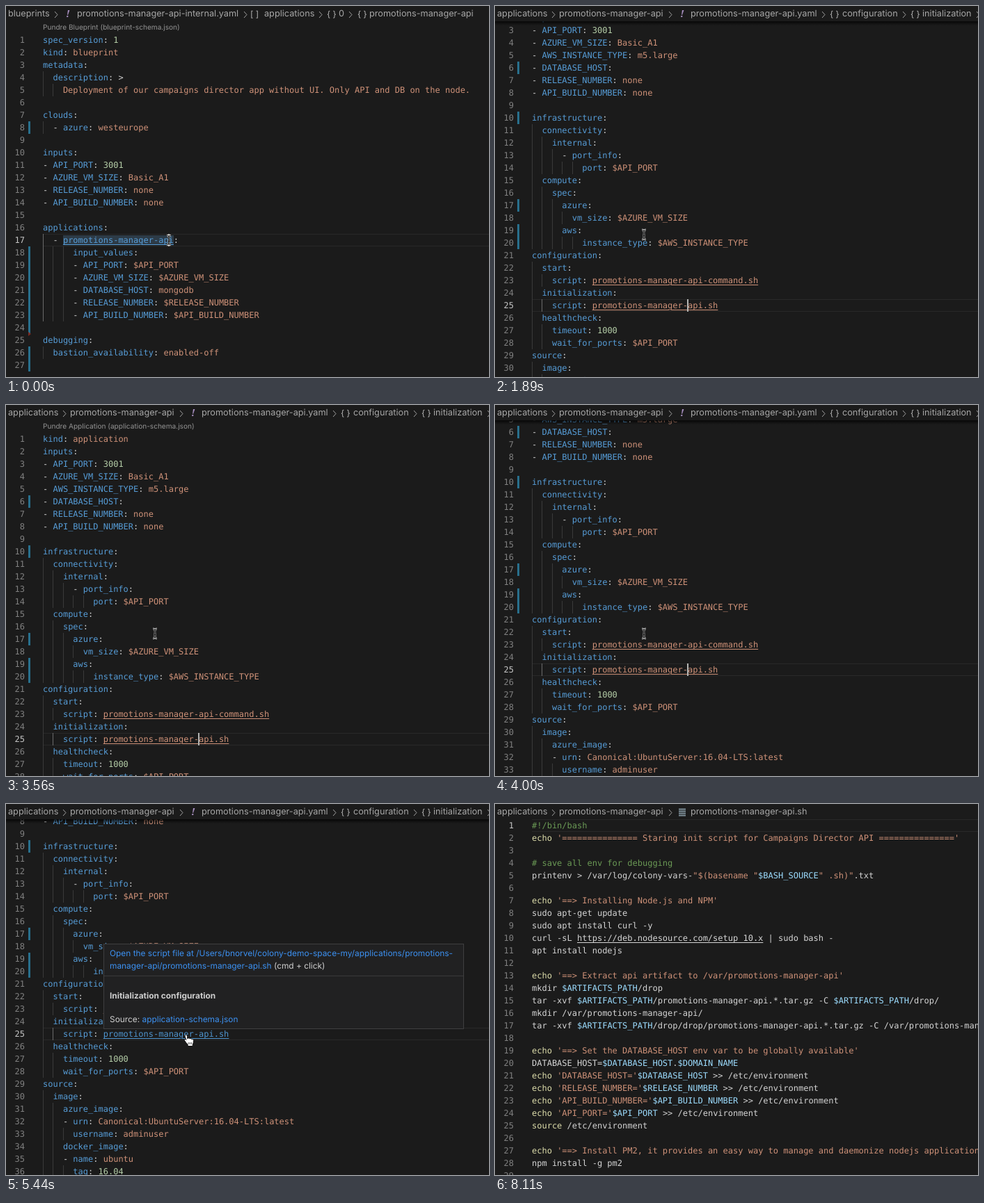
These frames come from a looping animation (694 px wide and 534 px high, 8.16 s). An HTML page:

```html
<!DOCTYPE html>
<html lang="en">
<head>
<meta charset="utf-8">
<title>Blueprint navigation</title>
<style>
html, body { margin: 0; width: 100%; height: 100%; overflow: hidden; background: #1b1b1b; }
#stage { position: relative; width: 694px; height: 534px; overflow: hidden; text-rendering: geometricPrecision; }
.scene, .crumbs, .view, .body { position: absolute; inset: 0; }
.scene, .popup, .caret, #mouse svg { visibility: hidden; }
.on { visibility: inherit !important; }
.scene.on, .popup.on, .caret.on, #mouse svg.on { visibility: visible !important; }
.crumbs { height: 22px; font: 12.7px/24px Inter, sans-serif; color: #a6a6a6; }
.crumbs > * { position: absolute; top: 0; white-space: pre; }
.crumbs svg { top: 7px; fill: none; stroke: #a0a0a0; }
.crumbs .bang { color: #a88fc0; font: italic bold 14px/24px "Noto Serif", serif; }
.crumbs .sym { font-size: 12px; line-height: 23px; color: #b4b4b4; }
.view { top: 22px; overflow: hidden; }
.view.deep::after { content: ""; position: absolute; inset: 0 0 auto; height: 6px; background: linear-gradient(#000b, #0000); }
.body { font: 12px/18px "DejaVu Sans Mono", monospace; color: #d4d4d4; }
.lens { position: absolute; left: 53px; top: 0; font: 10.1px/19px Inter, sans-serif; color: #939393; white-space: pre; }
.line { position: absolute; left: 53px; width: 660px; height: 18px; white-space: pre; }
.line.now { box-shadow: inset 0 1px #292929, inset 0 -1px #292929; }
.num { position: absolute; left: -53px; width: 27px; text-align: right; color: #808080; }
.now .num { color: #c6c6c6; }
.line i { position: absolute; top: 0; width: 1px; height: 18px; background: #3a3a3a; }
.line i.act { background: #6a6a6a; }
.bar { position: absolute; left: 32px; width: 3px; background: #286f8c; }
.del { position: absolute; left: 32px; border: solid transparent; border-width: 3px 0 3px 4px; border-left-color: #7c2a20; }
.caret { position: absolute; width: 2px; height: 18px; margin-left: -1px; background: #b4b5b3; }
.k { color: #569cd6; } .s { color: #ce9178; } .n { color: #b5cea8; }
.c { color: #6a9955; } .v { color: #9cdcfe; } .f { color: #dcdcaa; }
.u { text-decoration: underline 1px; text-underline-offset: 2px; }
.mark { background: linear-gradient(#2d3b47, #2d3b47) 0 50% / 100% 16px no-repeat; }
.hot .s.u { color: #4e94ce; }
.popup { position: absolute; width: 516px; height: 121px; background: #212122; border: 1px solid #3f3f40; font: 11.9px/18px Inter, sans-serif; color: #cfcfcf; }
.popup p { position: absolute; left: 8px; margin: 0; white-space: pre; }
.popup hr { position: absolute; left: 0; right: 0; top: 45px; margin: 0; border: 0; height: 1px; background: #3a3a3b; }
.popup a { color: #3c90f0; }
#mouse { position: absolute; left: 0; top: 0; width: 0; height: 0; }
#mouse svg { position: absolute; left: -8px; top: -9px; }
</style>
</head>
<body>
<div id="stage"></div>
<script>
const LOOP = 8160, ROW = 18;
const stage = document.getElementById('stage');

const esc = s => s.replace(/&/g, '&amp;').replace(/</g, '&lt;').replace(/>/g, '&gt;');
const span = (cls, s) => `<span class="${cls}">${esc(s)}</span>`;

function yaml(text) {
  const m = text.match(/^(\s*(?:- )?)([\w-]+)(:)(.*)$/);
  if (!m) return span('s', text);
  const [, lead, key, colon, rest] = m;
  const val = rest.trim();
  const kind = val === '>' ? '' : /^[\d.]+$/.test(val) ? 'n' : /\.sh$/.test(val) ? 's u' : 's';
  const keyKind = key === 'promotions-manager-api' ? 'k u mark' : 'k';
  return lead + span(keyKind, key) + colon + (val ? ' ' + span(kind, val) : '');
}

function bash(text) {
  const token = /(^#.*)|('[^']*'|"[^"]*")|(\$[A-Z_]+)|(https:\S+)|(^(?:echo|source)\b)/g;
  const kinds = ['c', 's', 'v', 'u', 'f'];
  let out = '', at = 0;
  for (const m of text.matchAll(token)) {
    out += esc(text.slice(at, m.index)) + span(kinds[m.slice(1).findIndex(Boolean)], m[0]);
    at = m.index + m[0].length;
  }
  return out + esc(text.slice(at));
}

const blueprint = `spec_version: 1
kind: blueprint
metadata:
  description: >
    Deployment of our campaigns director app without UI. Only API and DB on the node.

clouds:
  - azure: westeurope

inputs:
- API_PORT: 3001
- AZURE_VM_SIZE: Basic_A1
- RELEASE_NUMBER: none
- API_BUILD_NUMBER: none

applications:
  - promotions-manager-api:
      input_values:
      - API_PORT: $API_PORT
      - AZURE_VM_SIZE: $AZURE_VM_SIZE
      - DATABASE_HOST: mongodb
      - RELEASE_NUMBER: $RELEASE_NUMBER
      - API_BUILD_NUMBER: $API_BUILD_NUMBER

debugging:
  bastion_availability: enabled-off
`;

const application = `kind: application
inputs:
- API_PORT: 3001
- AZURE_VM_SIZE: Basic_A1
- AWS_INSTANCE_TYPE: m5.large
- DATABASE_HOST:
- RELEASE_NUMBER: none
- API_BUILD_NUMBER: none

infrastructure:
  connectivity:
    internal:
      - port_info:
          port: $API_PORT
  compute:
    spec:
      azure:
        vm_size: $AZURE_VM_SIZE
      aws:
          instance_type: $AWS_INSTANCE_TYPE
configuration:
  start:
    script: promotions-manager-api-command.sh
  initialization:
    script: promotions-manager-api.sh
  healthcheck:
    timeout: 1000
    wait_for_ports: $API_PORT
source:
  image:
    azure_image:
    - urn: Canonical:UbuntuServer:16.04-LTS:latest
      username: adminuser
    docker_image:
    - name: ubuntu
      tag: 16.04`;

const script = `#!/bin/bash
echo '=============== Staring init script for Campaigns Director API ==============='

# save all env for debugging
printenv > /var/log/colony-vars-"$(basename "$BASH_SOURCE" .sh)".txt

echo '==> Installing Node.js and NPM'
sudo apt-get update
sudo apt install curl -y
curl -sL https://deb.nodesource.com/setup_10.x | sudo bash -
apt install nodejs

echo '==> Extract api artifact to /var/promotions-manager-api'
mkdir $ARTIFACTS_PATH/drop
tar -xvf $ARTIFACTS_PATH/promotions-manager-api.*.tar.gz -C $ARTIFACTS_PATH/drop/
mkdir /var/promotions-manager-api/
tar -xvf $ARTIFACTS_PATH/drop/drop/promotions-manager-api.*.tar.gz -C /var/promotions-manager-api/

echo '==> Set the DATABASE_HOST env var to be globally available'
DATABASE_HOST=$DATABASE_HOST.$DOMAIN_NAME
echo 'DATABASE_HOST='$DATABASE_HOST >> /etc/environment
echo 'RELEASE_NUMBER='$RELEASE_NUMBER >> /etc/environment
echo 'API_BUILD_NUMBER='$API_BUILD_NUMBER >> /etc/environment
echo 'API_PORT='$API_PORT >> /etc/environment
source /etc/environment

echo '==> Install PM2, it provides an easy way to manage and daemonize nodejs applications'
npm install -g pm2
`;

// Breadcrumb pieces: [x, text]; '>' is a chevron, '#' the file icon
function crumb([x, text]) {
  if (text === '>') return `<svg style="left:${x - 4}px" width="8" height="11"><path d="M2 1l4 4.5-4 4.5"/></svg>`;
  if (text === '#') return `<svg style="left:${x - 6}px;top:6px" width="12" height="12"><path d="M1 1.5h10M1 4.5h10M1 7.5h10M1 10.5h10" stroke="#7d8e98" stroke-width="2"/></svg>`;
  const cls = text === '!' ? 'bang' : /^[[{]/.test(text) ? 'sym' : '';
  return `<span class="${cls}" style="left:${x}px">${text}</span>`;
}

function popup({ x, y, links, title, schema }) {
  return `<div class="popup" style="left:${x}px;top:${y}px">
<p style="top:4px"><a>${links[0]}</a></p><p style="top:22px"><a>${links[1]}</a> (cmd + click)</p><hr>
<p style="top:65px"><b>${title}</b></p><p style="top:99px">Source: <a>${schema}</a></p></div>`;
}

function build(s) {
  const top = s.lens ? ROW : 0;
  const rowY = n => top + (n - 1) * ROW;
  const rows = s.text.split('\n').map((text, i) => {
    const n = i + 1, indent = text.search(/\S/);
    let guides = '';
    for (let c = 0; c < indent; c += 2) {
      const [col, from, to] = s.guide;
      const act = c === col && n >= from && n <= to;
      guides += `<i class="${act ? 'act' : ''}" style="left:${c}ch"></i>`;
    }
    return `<div class="line ${n === s.row ? 'now' : ''}" style="top:${rowY(n)}px"><span class="num">${n}</span>${guides}${text ? s.paint(text) : ''}</div>`;
  });
  const bars = s.bars.map(([a, b]) => `<div class="bar" style="top:${rowY(a)}px;height:${(b - a + 1) * ROW}px"></div>`);
  const el = document.createElement('div');
  el.className = 'scene';
  el.innerHTML = `<div class="crumbs">${s.crumbs.map(crumb).join('')}</div>
<div class="view"><div class="body">${s.lens ? `<div class="lens">${s.lens}</div>` : ''}${rows.join('')}${bars.join('')}
${s.del ? `<div class="del" style="top:${rowY(s.del) - 3}px"></div>` : ''}
<div class="caret" style="left:calc(53px + ${s.col}ch);top:${rowY(s.row)}px"></div></div></div>${s.popup ? popup(s.popup) : ''}`;
  stage.append(el);
  const get = q => el.querySelector(q);
  return { el, view: get('.view'), body: get('.body'), caret: get('.caret'), popup: get('.popup') };
}

const path = [[3, 'applications'], [84, '>'], [92, 'promotions-manager-api'], [252, '>']];
const scenes = [
  {
    text: blueprint, paint: yaml, lens: 'Pundre Blueprint (blueprint-schema.json)',
    row: 17, col: 25, guide: [0, 17, 23], bars: [[8, 8], [18, 24], [26, 27]], del: 25,
    crumbs: [[3, 'blueprints'], [72, '>'], [86, '!'], [102, 'promotions-manager-api-internal.yaml'], [344, '>'],
      [351, '[ ]'], [371, 'applications'], [452, '>'], [461, '{ }'], [478, '0'], [495, '>'], [505, '{ }'], [522, 'promotions-manager-api']],
    popup: { x: 82, y: 207, title: 'Application', schema: 'blueprint-schema.json',
      links: ['Open the application file at /Users/bnorvel/colony-demo-space-', 'my/applications/promotions-manager-api/promotions-manager-api.yaml'] }
  },
  {
    text: application, paint: yaml, lens: 'Pundre Application (application-schema.json)',
    row: 25, col: 31, guide: [2, 25, 25], bars: [[6, 6], [10, 10], [17, 17], [19, 20]],
    crumbs: [...path, [266, '!'], [281, 'promotions-manager-api.yaml'], [472, '>'], [481, '{ }'], [499, 'configuration'],
      [588, '>'], [597, '{ }'], [614, 'initialization'], [694, '>']],
    popup: { x: 140, y: 201, title: 'Initialization configuration', schema: 'application-schema.json',
      links: ['Open the script file at /Users/bnorvel/colony-demo-space-my/applications/promotions-', 'manager-api/promotions-manager-api.sh'] }
  },
  {
    text: script, paint: bash, row: 1, col: 0, guide: [], bars: [],
    crumbs: [...path, [269, '#'], [281, 'promotions-manager-api.sh']]
  }
].map(build);

const mouse = document.createElement('div');
mouse.id = 'mouse';
const beam = 'M5 2q3 0 3 2.5v9q0 2.5-3 2.5M11 2q-3 0-3 2.5v9q0 2.5 3 2.5M6.5 10.500h3';
mouse.innerHTML = `<svg width="16" height="18" fill="none"><path d="${beam}" stroke="#e8e8e8" stroke-width="2.4"/><path d="${beam}" stroke="#111"/></svg>
<svg width="26" height="30"><path d="M7 10q0-2 1.600-2 1.500 0 1.700 2l.7 4q.4-1.500 1.800-1.200 1 .2 1.200 1.300.6-1 1.800-.6 1 .3 1.100 1.300.8-.7 1.700-.2.9.5.9 2 0 3.400-1.300 6v1.900h-7v-1.900q-3.500-4.200-4.700-6.300-.5-1.500.7-1.800 1-.1 1.700 1z" fill="#fff" stroke="#111"/><path d="M12 19v3M14.200 19v3M16.400 19v3" stroke="#222" stroke-width=".8"/></svg>`;
stage.append(mouse);
const [ibeam, hand] = mouse.children;

// Time of each opening, wheel notch and mouse stop, in ms
const OPEN = [0, 1390, 5610];
const wheel = [[1840, 50], [2060, 100], [2780, 50], [2950, 0], [3840, 50], [4000, 100], [4170, 150]];
const stops = [[60, 234, 337], [450, 202, 341], [1450, 202, 341], [1700, 214, 329], [4300, 214, 329], [4520, 258, 333]];

const within = (t, a, b) => t >= a && t < b;
const show = (el, yes) => el && el.classList.toggle('on', yes);

function mouseAt(t) {
  let prev = stops[0];
  for (const next of stops) {
    if (t < next[0]) {
      const p = Math.max(0, (t - prev[0]) / (next[0] - prev[0] || 1));
      const e = p * p * (3 - 2 * p);
      return [1, 2].map(i => prev[i] + (next[i] - prev[i]) * e);
    }
    prev = next;
  }
  return prev.slice(1);
}

function render(t) {
  const now = t >= OPEN[2] ? 2 : t >= OPEN[1] ? 1 : 0;
  const hover = [within(t, 700, OPEN[1]), within(t, 4720, OPEN[2]), false];
  const blink = now ? (t + 480) % 1000 < 500 : t % 1000 < 500;
  scenes.forEach((s, i) => {
    const live = i === now;
    show(s.el, live);
    show(s.caret, live && blink);
    show(s.popup, live && hover[i]);
  });
  const scroll = now === 1 ? wheel.reduce((y, [at, to]) => t >= at ? to : y, 0) : 0;
  scenes[1].body.style.transform = `translateY(${-scroll}px)`;
  scenes[1].view.classList.toggle('deep', scroll > 0);
  // Only the hovered script link sits on the active row
  scenes[1].view.querySelector('.now').classList.toggle('hot', hover[1]);
  const [x, y] = mouseAt(t);
  mouse.style.transform = `translate(${x}px,${y}px)`;
  show(hand, hover[now]);
  show(ibeam, !hover[now] && t < 6700);
}

const start = performance.now();
function tick() {
  render((performance.now() - start) % LOOP);
  requestAnimationFrame(tick);
}
tick();
</script>
</body>
</html>
```
